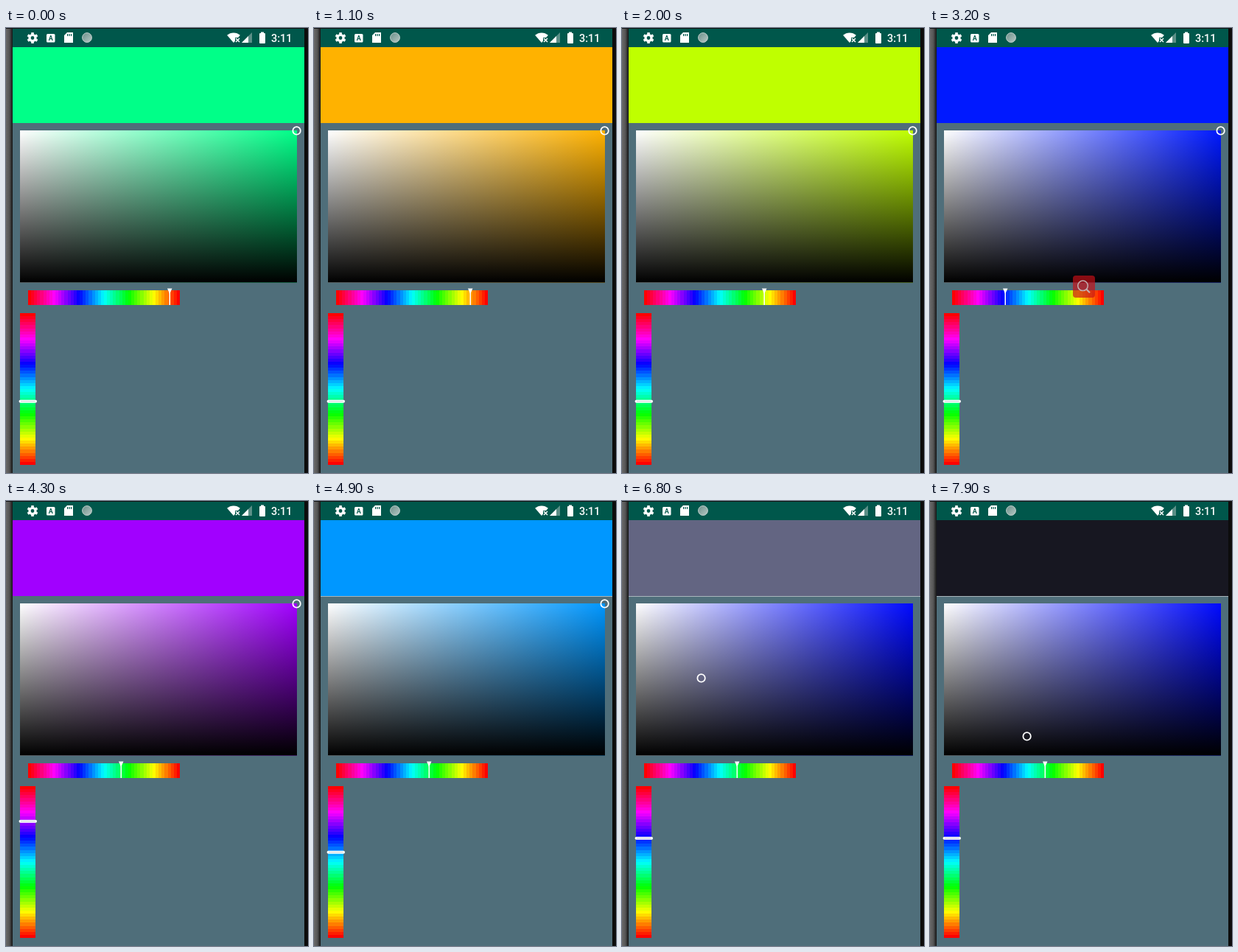
Recreate the animation shown at these times as an HTML page with a canvas. Size 410 by 604 pixels, loop 8 s.

```html
<!DOCTYPE html>
<html lang="en">
<head>
<meta charset="utf-8">
<title>Colour picker</title>
<style>
html, body { margin: 0; width: 100%; height: 100%; overflow: hidden; background: #4f6e7a; }
canvas { display: block; }
</style>
</head>
<body>
<canvas id="stage" width="410" height="604"></canvas>
<script>
const ctx = document.getElementById('stage').getContext('2d');
const LOOP = 8000, STEP = 100;
const SLATE = '#4f6e7a', TEAL = '#00574b';
const PAD = { x: 19, y: 139, w: 376, h: 206.5 };
const ROW = { x: 30, y: 356, len: 206, thick: 20 };
const COL = { x: 19, y: 387, len: 206, thick: 21 };

const ramp = (t, from, to) => Math.max(0, Math.min(1, (t - from) / (to - from)));
const mix = (a, b, p) => a + (b - a) * p;
const cubic = (a, b, c, d, p) => {
  const q = 1 - p;
  return q * q * q * a + 3 * q * q * p * b + 3 * q * p * p * c + p * p * p * d;
};

// Each press jumps to the finger, then the drag follows it.
function rowAt(t) {
  if (t < 1100) return 222;
  if (t < 1500) return mix(212, 119, ramp(t, 1100, 1500) ** 1.4);
  if (t < 3200) return 119 + 31 * ramp(t, 1500, 1700) + 43 * ramp(t, 1800, 2000);
  return mix(102, 156, Math.sin(ramp(t, 3200, 3700) * Math.PI / 2));
}

function colAt(t) {
  if (t < 4300) return 506;
  if (t < 4900) return mix(434, 509, ramp(t, 4300, 4600));
  const p = ramp(t, 4900, 5200);
  return mix(476, 457, p) - 15 * Math.sin(p * Math.PI);
}

function padAt(t) {
  if (t < 5900) return [395, 139];
  if (t < 6800) {
    const p = ramp(t, 5900, 6800);
    return [mix(330, 108, p), mix(180, 240, p)];
  }
  const p = .8 * ramp(t, 6800, 7600) + .2 * ramp(t, 7700, 7900);
  return [cubic(108, 10, 20, 132, p), cubic(240, 310, 375, 319, p)];
}

function hsv(h, s = 1, v = 1) {
  const part = n => {
    const k = (n + h / 60) % 6;
    return Math.round(255 * v * (1 - s * Math.max(0, Math.min(k, 4 - k, 1))));
  };
  return `rgb(${part(5)},${part(3)},${part(1)})`;
}

function rect(x, y, w, h, fill) {
  ctx.fillStyle = fill;
  ctx.fillRect(x, y, w, h);
}

function poly(fill, ...pts) {
  ctx.fillStyle = fill;
  ctx.beginPath();
  pts.forEach(p => ctx.lineTo(...p));
  ctx.fill();
}

function ring(x, y, r, width, stroke) {
  ctx.lineWidth = width;
  ctx.strokeStyle = stroke;
  ctx.beginPath();
  ctx.arc(x, y, r, 0, 7);
  ctx.stroke();
}

function line(x1, y1, x2, y2, width, stroke) {
  ctx.lineWidth = width;
  ctx.strokeStyle = stroke;
  ctx.beginPath();
  ctx.moveTo(x1, y1);
  ctx.lineTo(x2, y2);
  ctx.stroke();
}

function rounded(x, y, w, h, r, fill) {
  ctx.fillStyle = fill;
  ctx.beginPath();
  ctx.roundRect(x, y, w, h, r);
  ctx.fill();
}

function text(str, x, y, font, fill) {
  ctx.font = font;
  ctx.fillStyle = fill;
  ctx.fillText(str, x, y);
}

function gradient(x1, y1, x2, y2, ...colors) {
  const g = ctx.createLinearGradient(x1, y1, x2, y2);
  colors.forEach((c, i) => g.addColorStop(i / (colors.length - 1), c));
  return g;
}

function statusBar() {
  rect(9, 0, 396, 26, TEAL);
  rect(0, 0, 410, 1, '#111');

  ring(36, 13.5, 4, 3.2, '#fff');
  for (let i = 0; i < 6; i++) {
    const a = (i + .5) * Math.PI / 3, c = Math.cos(a), s = Math.sin(a);
    line(36 + 4 * c, 13.5 + 4 * s, 36 + 7.4 * c, 13.5 + 7.4 * s, 3.6, '#fff');
  }

  rounded(55, 8, 11.5, 11.5, 1.5, '#fff');
  text('A', 57.7, 17, 'bold 9px Roboto, sans-serif', TEAL);

  poly('#fff', [83, 6], [91, 6], [91, 20], [79, 20], [79, 10]);
  for (let x = 83; x < 90; x += 2.5) rect(x, 8, 1.2, 3, TEAL);

  ring(110, 13, 3.3, 6.6, gradient(104, 7, 116, 19, '#6d918b', '#b4c6c3'));
  ring(110, 13, 6.4, 1, '#b9cbc8');

  ctx.fillStyle = '#fff';
  ctx.beginPath();
  ctx.moveTo(309, 20);
  ctx.arc(309, 20, 13.5, -2.29, -0.85);
  ctx.fill();
  rect(311, 13, 8, 8, TEAL);
  line(312, 14, 317, 19, 1.5, '#fff');
  line(317, 14, 312, 19, 1.5, '#fff');

  poly('#5b8f87', [334, 6], [334, 20], [320, 20]);
  poly('#fff', [329, 11], [329, 20], [320, 20]);

  rounded(344, 7, 8, 14, 1, '#fff');
  rect(346, 5.5, 4, 2, '#fff');
  text('3:11', 360, 19, '500 14.5px Roboto, sans-serif', '#fff');
}

function hueBars() {
  const bands = 50, size = ROW.len / bands;
  for (let i = 0; i < bands; i++) {
    const fill = hsv(360 * (1 - i / (bands - 1)));
    const a = Math.round(i * size), b = Math.round((i + 1) * size);
    rect(ROW.x + a, ROW.y, b - a, ROW.thick, fill);
    rect(COL.x, COL.y + a, COL.thick, b - a, fill);
  }
}

function magnifier(x, y, height = 30) {
  ctx.save();
  ctx.beginPath();
  ctx.rect(x, y, 30, height);
  ctx.clip();
  rounded(x, y, 30, 30, 4, 'rgba(200,16,24,.68)');
  ring(x + 13.5, y + 13.8, 6.8, 1.5, '#c4aeae');
  line(x + 18.5, y + 18.8, x + 23, y + 23.3, 2.2, '#c4aeae');
  ctx.restore();
}

function draw(t) {
  const rowX = rowAt(t), colY = colAt(t), [px, py] = padAt(t);
  const fromRow = t >= 1100 && t < 4300;
  const hue = 360 * (1 - (fromRow ? (rowX - ROW.x) / ROW.len : (colY - COL.y) / COL.len));

  rect(0, 0, 410, 604, SLATE);
  rect(0, 0, 9, 604, gradient(0, 0, 9, 0, '#6a6a6a', '#555', '#141414'));
  rect(405, 0, 5, 604, '#0c0c0c');
  statusBar();
  rect(9, 26, 396, 103, hsv(hue, (px - PAD.x) / PAD.w, 1 - (py - PAD.y) / PAD.h));
  if (t >= 4900) rect(9, 129, 396, 1, '#a9b6bc');

  const { x, y, w, h } = PAD;
  rect(x, y, w, h, gradient(x, 0, x + w, 0, '#fff', hsv(hue)));
  rect(x, y, w, h, gradient(0, y, 0, y + h, 'rgba(0,0,0,0)', '#000'));
  ring(px - .4, py + .4, 5.2, 1.8, '#fff');

  hueBars();
  rect(rowX - .5, ROW.y, 1.5, ROW.thick, '#fff');
  poly('#fff', [rowX - 3, 353.5], [rowX + 3.5, 353.5], [rowX + .2, 361]);
  rounded(17.5, colY - 1.3, 24.5, 4, 2, '#fff');
  rect(20, colY + .3, 19.5, .8, 'rgba(80,110,122,.4)');

  if (t >= 2600 && t < 3300) magnifier(194, 336);
  if (t >= 4000 && t < 4300) magnifier(157, 323, 22);
  if (t >= 5400 && t < 6000) magnifier(30, 410);
}

function frame() {
  const t = performance.now() % LOOP;
  draw(Math.floor(t / STEP) * STEP);
  requestAnimationFrame(frame);
}
frame();
</script>
</body>
</html>
```
